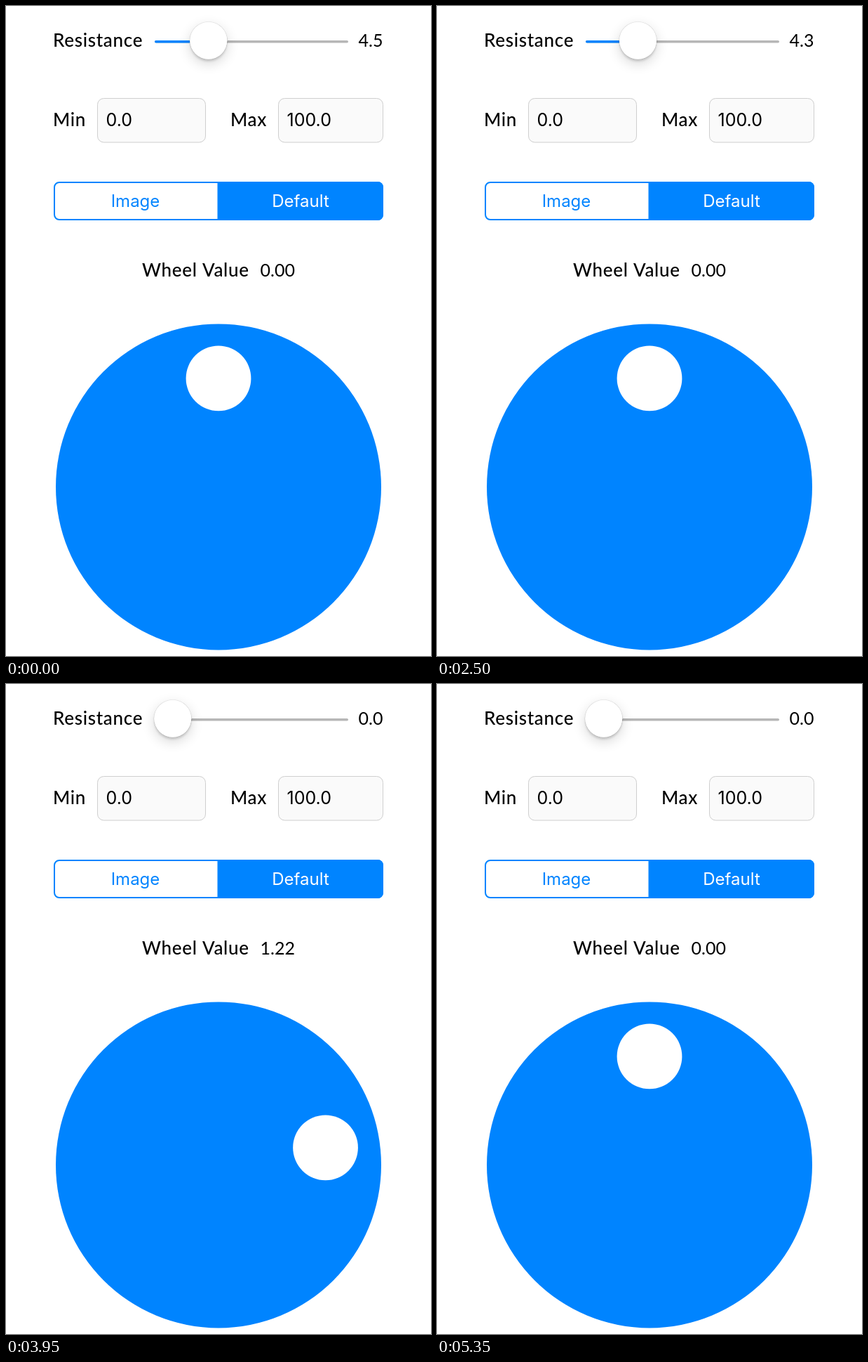
An HTML page with a canvas that plays this animation: 606x925 px, repeating every 6 s.

```html
<!DOCTYPE html>
<html lang="en">
<head>
<meta charset="utf-8">
<title>Wheel control</title>
<style>
html, body { margin: 0; width: 100%; height: 100%; overflow: hidden; background: #fff; }
canvas { display: block; width: 606px; height: 925px; }
</style>
</head>
<body>
<canvas id="stage"></canvas>
<script>
const W = 606, H = 925, LOOP = 6000, STEP = 50;
const BLUE = '#0084ff';
const LABEL = '500 26px Lato, "Open Sans", sans-serif';
const VALUE = '400 25px Lato, "Open Sans", sans-serif';
const FIELD = '400 25px Inter, Roboto, sans-serif';
const TAB = '400 24px Inter, Roboto, sans-serif';

const canvas = document.getElementById('stage');
const ctx = canvas.getContext('2d');
const dpr = window.devicePixelRatio || 1;
canvas.width = W * dpr;
canvas.height = H * dpr;
ctx.scale(dpr, dpr);

// Turns of the wheel as [time, value]: a damped spin, then a nearly free one.
const SPIN_SLOW = [[650, 0], [700, 0.02], [900, 0.22], [1100, 0.38], [1250, 0.44]];
const SPIN_FREE = [[3150, 0], [3200, 0.022], [3400, 0.265], [3600, 0.632],
                   [3950, 1.2246], [4450, 1.929], [5100, 2.65]];
const SLIDE = [[2450, 4.5], [2500, 4.3], [2600, 4.3], [2650, 2.9], [2700, 1], [2750, 0]];

function slope(pts, i) {
  const a = pts[Math.max(i - 1, 0)], b = pts[Math.min(i + 1, pts.length - 1)];
  return (b[1] - a[1]) / (b[0] - a[0]);
}

function curve(pts, t) {
  const last = pts.length - 1;
  if (t <= pts[0][0]) return pts[0][1];
  if (t >= pts[last][0]) return pts[last][1];
  let i = 0;
  while (t >= pts[i + 1][0]) i++;
  const [t0, v0] = pts[i], [t1, v1] = pts[i + 1];
  const d = t1 - t0, u = (t - t0) / d, w = 1 - u;
  return v0 * (1 + 2 * u) * w * w + slope(pts, i) * d * u * w * w
       + v1 * u * u * (3 - 2 * u) - slope(pts, i + 1) * d * u * u * w;
}

function linear(pts, t) {
  if (t <= pts[0][0]) return pts[0][1];
  for (let i = 1; i < pts.length; i++) {
    const [t0, v0] = pts[i - 1], [t1, v1] = pts[i];
    if (t <= t1) return v0 + (v1 - v0) * (t - t0) / (t1 - t0);
  }
  return pts[pts.length - 1][1];
}

function wheelValue(t) {
  if (t < 1300) return curve(SPIN_SLOW, t);
  if (t >= 3150 && t < 5350) return curve(SPIN_FREE, t);
  return 0;
}

function text(str, x, y, font, color = '#000', align = 'left', spacing = 0) {
  ctx.font = font;
  ctx.letterSpacing = spacing + 'px';
  ctx.textAlign = align;
  ctx.fillStyle = color;
  ctx.fillText(str, x, y);
}

function label(str, x, y) {
  text(str, x, y, LABEL, '#000', 'left', 0.7);
}

function disc(x, y, r, color) {
  ctx.beginPath();
  ctx.arc(x, y, r, 0, Math.PI * 2);
  ctx.fillStyle = color;
  ctx.fill();
}

function box(x, y, w, h, r) {
  ctx.beginPath();
  ctx.roundRect(x, y, w, h, r);
}

function fillBox(x, y, w, h, r, color) {
  box(x, y, w, h, r);
  ctx.fillStyle = color;
  ctx.fill();
}

function strokeBox(x, y, w, h, r, color, width) {
  box(x, y, w, h, r);
  ctx.strokeStyle = color;
  ctx.lineWidth = width;
  ctx.stroke();
}

function shadowDisc(x, y, r, dy, blur, alpha) {
  ctx.save();
  ctx.shadowColor = `rgba(0,0,0,${alpha})`;
  ctx.shadowOffsetY = dy * dpr;
  ctx.shadowBlur = blur * dpr;
  disc(x, y, r, '#fff');
  ctx.restore();
}

function drawSlider(value) {
  const x = 237.7 + value * 11.35, y = 49.2, r = 26.5;
  label('Resistance', 67, 58);
  fillBox(212, 49, 276, 3.6, 1.8, '#b7b7b7');
  fillBox(212, 49, x - 212, 3.6, 1.8, BLUE);
  shadowDisc(x, y, r, 6, 18, 0.16);
  shadowDisc(x, y, r, 3, 3, 0.14);
  disc(x, y, r + 0.5, 'rgba(0,0,0,0.13)');
  disc(x, y, r, '#fff');
  text(value.toFixed(1), 502.5, 57.5, VALUE);
}

function drawField(name, nameX, x, w, value) {
  label(name, nameX, 171);
  fillBox(x, 131, w, 63.5, 9, '#fafafa');
  strokeBox(x + 0.5, 131.5, w - 1, 62.5, 9, '#cfcfcf', 1);
  text(value, x + 12.5, 171, FIELD);
}

function drawTabs() {
  fillBox(301.5, 250, 236.5, 55, [0, 8, 8, 0], BLUE);
  strokeBox(69, 251, 468, 53, 7, BLUE, 2);
  text('Image', 184.5, 286, TAB, BLUE, 'center');
  text('Default', 420, 286, TAB, '#fff', 'center');
}

function drawWheel(value) {
  const cx = 303, cy = 684.4, arm = 154.5, a = value * Math.PI * 2;
  label('Wheel Value', 194, 385);
  text(value.toFixed(2), 362.5, 384.5, VALUE);
  disc(cx, cy, 232, BLUE);
  disc(cx + arm * Math.sin(a), cy - arm * Math.cos(a), 46.4, '#fff');
}

function draw(now) {
  const t = Math.floor((now % LOOP) / STEP) * STEP;
  ctx.fillStyle = '#fff';
  ctx.fillRect(0, 0, W, H);
  drawSlider(linear(SLIDE, t));
  drawField('Min', 67, 130, 155, '0.0');
  drawField('Max', 320, 388, 150, '100.0');
  drawTabs();
  drawWheel(wheelValue(t));
}

let start = null;
function tick(now) {
  if (start === null) start = now;
  draw(Math.max(0, now - start));
  requestAnimationFrame(tick);
}
draw(0);
requestAnimationFrame(tick);
</script>
</body>
</html>
```
